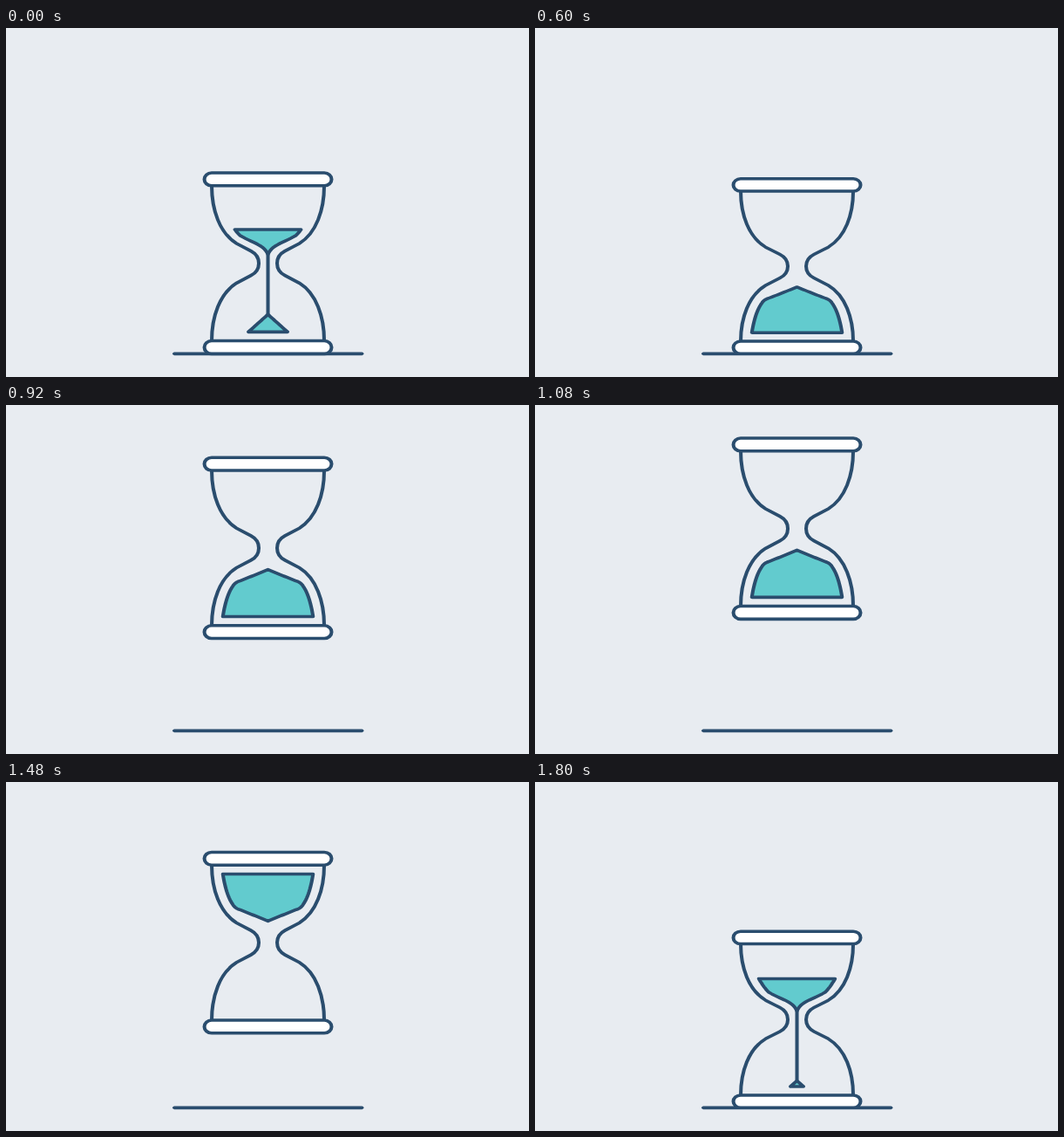
An HTML page that plays this animation: 600 by 400 pixels, repeating every 1.84 s.

```html
<!DOCTYPE html>
<html lang="en">
<head>
<meta charset="utf-8">
<title>Hourglass</title>
<style>
  html, body { margin: 0; width: 100%; height: 100%; overflow: hidden; background: #e8ecf1; }
  svg { display: block; width: 100vw; height: 100vh; }
  path, rect { fill: none; stroke: #2a4d6e; stroke-width: 5.4; stroke-linecap: round; stroke-linejoin: round; }
  .cap { fill: #fff; }
  .sand { fill: #62cbce; }
</style>
</head>
<body>
<svg viewBox="0 0 800 600" preserveAspectRatio="none">
  <path d="M257.5 560H544.5"/>
  <path id="swoosh"/>
  <g id="glass">
    <path d="M-86 -133C-86 -92 -74 -52 -48 -34L-26 -21C-10 -11.5 -10 11.5 -26 21L-48 34C-74 52 -86 92 -86 133"/>
    <path d="M86 -133C86 -92 74 -52 48 -34L26 -21C10 -11.5 10 11.5 26 21L48 34C74 52 86 92 86 133"/>
    <path id="stream"/>
    <path id="top" class="sand"/>
    <path id="heap" class="sand"/>
    <rect class="cap" x="-97.3" y="-155.5" width="194.6" height="22.2" rx="11.1"/>
    <rect class="cap" x="-97.3" y="133.3" width="194.6" height="22.2" rx="11.1"/>
  </g>
</svg>
<script>
const LOOP = 1840, STEP = 40, CX = 400.7, CY = 404.5, FLOOR = 560, APEX = 192;
const $ = id => document.getElementById(id);
const mix = (a, b, k) => a + (b - a) * k;
const span = (t, a, b) => Math.min(1, Math.max(0, (t - a) / (b - a)));
const outPow = (k, n) => 1 - (1 - k) ** n;
const inOut = (k, n) => k < .5 ? (2 * k) ** n / 2 : 1 - (2 - 2 * k) ** n / 2;
const bump = (t, a, b) => Math.sin(Math.PI * span(t, a, b));
const morph = (p, q, k) => p.map(([x, y], i) => [mix(x, q[i][0], k), mix(y, q[i][1], k)]);

// One side of the sand: wall curve, shoulder, slope to the tip.
const full = [[69, 118], [66, 96], [61, 77], [54, 66], [51, 60], [45, 57.5], [30, 51], [15, 44], [0, 37]];
const funnel = [[69, 118], [66, 96], [62, 76], [54, 64], [50, 56], [43, 48], [22, 34], [6, 32], [0, 15]];
const cone = [0, .12, .25, .35, .4, .45, .63, .82, 1].map(k => [30 * (1 - k), 118 - 30 * k]);

function bezier(pts, k) {
  while (pts.length > 1) pts = pts.slice(1).map((p, i) => [mix(pts[i][0], p[0], k), mix(pts[i][1], p[1], k)]);
  return pts[0];
}

function trace(side) {
  const line = [side[0]];
  for (const [a, b] of [[0, 4], [3, 6], [5, 9]])
    for (let i = 1; i <= 14; i++) line.push(bezier(side.slice(a, b), i / 14));
  return line;
}

// Keep the part of the side below the sand level.
function cut(line, level) {
  const i = line.findIndex(p => p[1] < level);
  if (i < 1) return i ? [] : line;
  const [a, b] = [line[i - 1], line[i]];
  return [[mix(a[0], b[0], (a[1] - level) / (a[1] - b[1])), level], ...line.slice(i)];
}

function closed(line, flip) {
  if (line.length < 2) return "";
  const both = [...line, ...line.slice(0, -1).reverse().map(([x, y]) => [-x, y])];
  return "M" + both.map(([x, y]) => x.toFixed(2) + " " + (y * flip).toFixed(2)).join("L") + "Z";
}

function arc(r, from, to, cy) {
  if (to - from < 1) return "";
  const at = deg => {
    const a = deg * Math.PI / 180;
    return (CX + r * Math.cos(a)).toFixed(2) + " " + (cy + r * Math.sin(a)).toFixed(2);
  };
  return `M${at(from)}A${r} ${r} 0 0 1 ${at(to)}`;
}

function heapPath(t) {
  if (t < 1640) return closed(trace(full), 1);
  if (t <= 1780) return "";
  const grow = (t - 1780) / 60;
  const side = grow < 1
    ? cone.map(([x, y]) => [x * grow, 118 - (118 - y) * grow])
    : morph(cone, full, outPow(span(t, LOOP, 2200), 2));
  return closed(trace(side), 1);
}

function topPath(t) {
  if (t < 1280 || t >= 2085) return "";
  const level = t < LOOP ? Math.min(118, 58 + .35 * (LOOP - t)) : 58 - 43 * outPow(span(t, LOOP, 2085), 2);
  return closed(cut(trace(morph(full, funnel, span(t, 1650, 1740))), level), -1);
}

function streamPath(t) {
  if (t <= 1700 || t >= 2160) return "";
  const tip = t < LOOP ? 118 - 30 * span(t, 1780, LOOP) : mix(88, 37, outPow(span(t, LOOP, 2200), 2));
  const from = mix(-15, tip, span(t, 2085, 2160) ** 2);
  const to = mix(-15, tip, span(t, 1700, 1780));
  return `M0 ${from}V${to}`;
}

function draw(now) {
  const phase = Math.floor(now % LOOP / STEP) * STEP;
  const t = phase < 480 ? phase + LOOP : phase;
  const lift = APEX * (outPow(span(t, 696, 1080), 2) - span(t, 1260, 1642) ** 2);
  const squash = 1 - .041 * bump(t, 560, 696) - .0425 * bump(t, 1640, 1840);
  const turning = t < 1280;
  const angle = turning ? 180 * inOut(span(t, 1080, 1280), 2.16) : 0;
  $("glass").setAttribute("transform",
    `translate(${CX} ${FLOOR}) scale(1 ${squash}) translate(0 ${CY - FLOOR - lift}) rotate(${angle})`);
  $("heap").setAttribute("d", turning || t >= 1640 ? heapPath(t) : "");
  $("top").setAttribute("d", topPath(t));
  $("stream").setAttribute("d", streamPath(t));

  const head = outPow(span(t, 1160, 1280), 1.7), tail = inOut(span(t, 1200, 1360), 2);
  let d = "";
  for (const [r, a, b] of [[144.5, 120, 230], [97.5, 128, 211]])
    for (const turn of [0, 180])
      d += arc(r, mix(a, b, tail) + turn, mix(a, b, head) + turn, CY - APEX);
  $("swoosh").setAttribute("d", d);
}

const start = performance.now();
function tick() {
  draw(performance.now() - start);
  requestAnimationFrame(tick);
}
tick();
</script>
</body>
</html>
```
